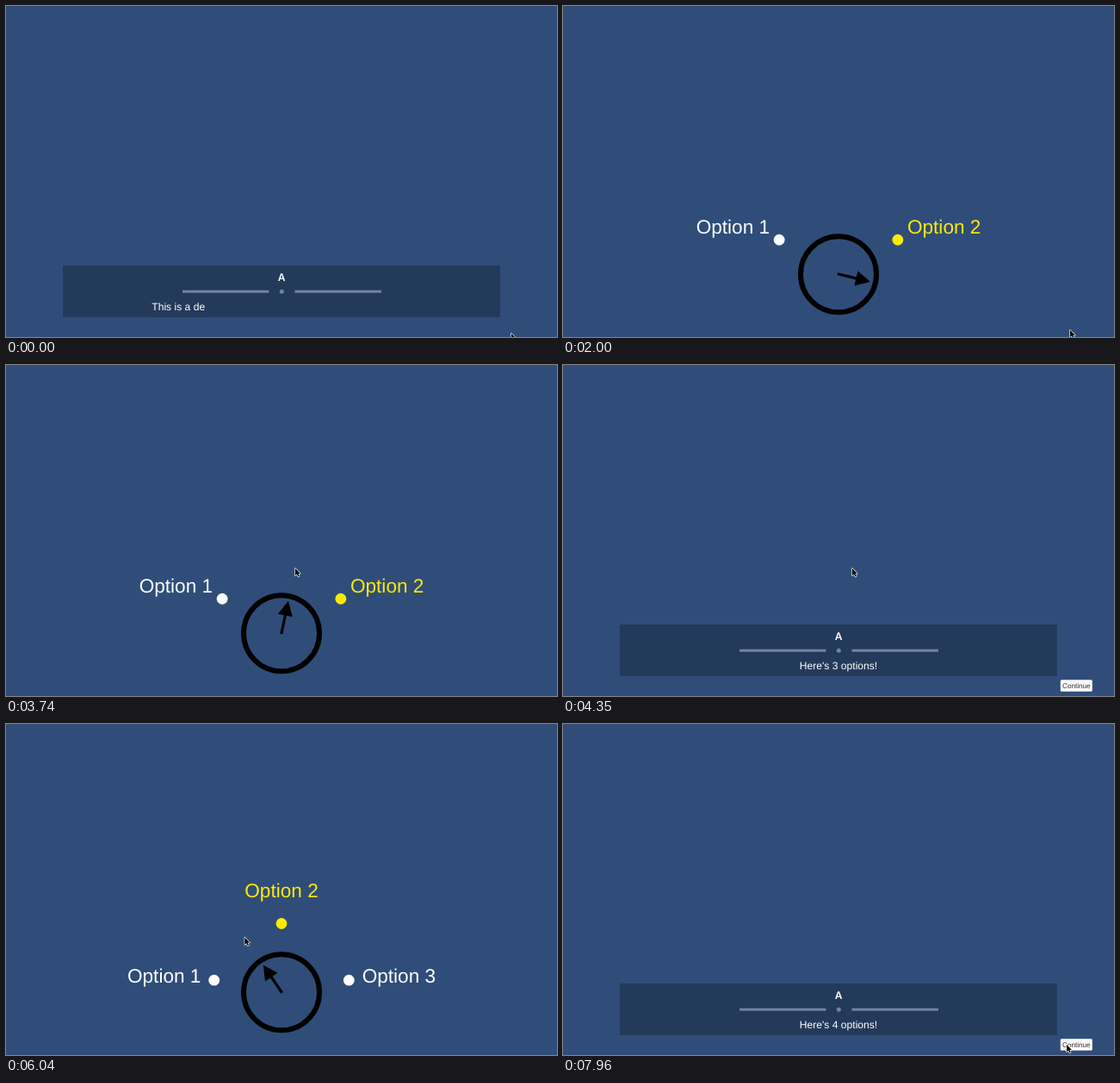
Recreate the animation shown at these times as an HTML page with a canvas. Size 640 by 384 pixels, loop 8000 ms.

```html
<!DOCTYPE html>
<html lang="en">
<head>
<meta charset="utf-8">
<title>Dialogue options</title>
<style>
html, body { margin: 0; height: 100%; overflow: hidden; background: #304d79; }
canvas { display: block; }
</style>
</head>
<body>
<canvas id="stage" width="640" height="384"></canvas>
<script>
const ctx = document.getElementById('stage').getContext('2d');
const { PI, abs, sin, cos, atan2, min, max, floor } = Math;
const LOOP = 8000;
const SANS = '"Liberation Sans", Arial, sans-serif';
const CX = 320, CY = 311;
const RATE = 0.115; // typed characters per ms

// Each round: line typed, Continue clicked, option picked.
// Options fan out by `spread` degrees to both sides of straight up.
const rounds = [
  { open: -405, click: 1150, pick: 3740, count: 2, spread: 60, intro: 'This is a demo of the Automatic layout! ' },
  { open: 3740, click: 4870, pick: 6740, count: 3, spread: 80, intro: '' },
  { open: 6740, click: LOOP, pick: LOOP, count: 4, spread: 90, intro: '' },
];

// Pointer moves: start time and destination
const MOVE = 300;
const moves = [
  [-MOVE, 587, 380], [50, 589, 376],
  [2100, 300, 238], [2370, 336, 237], [2800, 300, 238], [3200, 336, 236],
  [4420, 590, 367],
  [5500, 240, 250], [5900, 322, 245], [6200, 509, 245],
  [7420, 585, 372],
];

const ramp = (t, from, length) => min(1, max(0, (t - from) / length));
const mix = (a, b, k) => a + (b - a) * k;
const rad = deg => deg * PI / 180;

function pointerAt(t) {
  const i = moves.findLastIndex(m => m[0] <= t);
  const [t0, x, y] = moves[i], [, fromX, fromY] = moves[max(0, i - 1)];
  const k = ramp(t, t0, MOVE), ease = k * k * (3 - 2 * k);
  return [mix(fromX, x, ease), mix(fromY, y, ease)];
}

function label(text, x, y, size, color, family = SANS, weight = 400) {
  ctx.font = `${weight} ${size}px ${family}`;
  ctx.fillStyle = color;
  ctx.fillText(text, x, y);
}

function box(x, y, w, h, color, radius = 0) {
  ctx.fillStyle = color;
  ctx.beginPath();
  ctx.roundRect(x, y, w, h, radius);
  ctx.fill();
}

function disc(x, y, r, color) {
  ctx.fillStyle = color;
  ctx.beginPath();
  ctx.arc(x, y, r, 0, 2 * PI);
  ctx.fill();
}

function polygon(...pts) {
  ctx.beginPath();
  for (let i = 0; i < pts.length; i += 2) ctx.lineTo(pts[i], pts[i + 1]);
  ctx.closePath();
}

function drawDialog({ open, click, count, intro }, t) {
  const leave = 1 - ramp(t, click, 180);
  if (t < open || !leave) return;

  // The panel follows shortly after its content
  ctx.globalAlpha = leave * ramp(t, open + 90, 110);
  box(66, 301, 508, 60, '#243a5b');

  ctx.globalAlpha = leave * ramp(t, open + 20, 120);
  for (const x of [205, 335.5]) box(x, 329.8, 100.4, 2.9, '#7284a2');
  disc(320.3, 331.2, 2.5, '#7284a2');
  ctx.textAlign = 'center';
  label('A', CX, 318.7, 12, '#fff', 'Inter, sans-serif', 600);

  // Typed text keeps the place it has when complete
  const text = `${intro}Here's ${count} options!`;
  const typed = max(0, floor((t - open - 300) * RATE));
  ctx.textAlign = 'left';
  ctx.font = `12.1px ${SANS}`;
  const left = CX - ctx.measureText(text).width / 2;
  label(text.slice(0, typed), left, 352.5, 12.1, '#fff');

  if (typed > text.length + 3) {
    box(577.8, 365.3, 37, 13.4, '#fafafa', 1.5);
    ctx.textAlign = 'center';
    label('Continue', 596.3, 375, 8.15, '#323232');
  }
}

function drawMenu({ click, pick, count, spread }, t, [px, py]) {
  ctx.globalAlpha = ramp(t, click + 200, 180) * (1 - ramp(t, pick, 80));
  if (!ctx.globalAlpha) return;

  // The arrow starts pointing down, then swings to the pointer
  const aim = mix(PI / 2, atan2(py - CY, px - CX), ramp(t, click + 300, 260));
  const angles = Array.from({ length: count }, (_, i) => rad(spread * (2 * i / (count - 1) - 1) - 90));
  const gap = a => abs(atan2(sin(aim - a), cos(aim - a)));
  const closest = min(...angles.map(gap), rad(59));

  ctx.textAlign = 'center';
  angles.forEach((a, i) => {
    const color = gap(a) <= closest ? '#ffeb04' : '#fff';
    const stretch = 1 + 0.105 * sin(a) ** 2;
    disc(CX + 79.5 * cos(a), CY + 79.5 * sin(a), 6.4, color);
    label(`Option ${i + 1}`, CX + 138 * stretch * cos(a), CY + 7.8 + 106.8 * stretch * sin(a), 22.6, color);
  });

  ctx.strokeStyle = '#000';
  ctx.lineWidth = 6;
  ctx.beginPath();
  ctx.arc(CX, CY + 0.2, 44, 0, 2 * PI);
  ctx.stroke();

  ctx.save();
  ctx.translate(CX, CY);
  ctx.rotate(aim);
  box(-1, -1.6, 23, 3.2, '#000');
  polygon(21, -8.7, 38, 0, 21, 8.7);
  ctx.fill();
  ctx.restore();
}

function drawPointer([x, y]) {
  ctx.globalAlpha = 1;
  ctx.save();
  ctx.translate(x, y);
  ctx.scale(0.92, 0.92);
  polygon(0, 0, 0, 9, 2.1, 7.1, 3.6, 10.4, 5.1, 9.7, 3.7, 6.5, 6.4, 6.4);
  ctx.lineJoin = 'round';
  ctx.lineWidth = 1.4;
  ctx.strokeStyle = '#fff';
  ctx.stroke();
  ctx.fillStyle = '#000';
  ctx.fill();
  ctx.restore();
}

function draw(t) {
  const pointer = pointerAt(t);
  ctx.textRendering = 'geometricPrecision';
  ctx.globalAlpha = 1;
  box(0, 0, 640, 384, '#304d79');
  for (const round of rounds) {
    drawDialog(round, t);
    drawMenu(round, t, pointer);
  }
  drawPointer(pointer);
}

const start = performance.now();
function tick() {
  draw((performance.now() - start) % LOOP);
  requestAnimationFrame(tick);
}
tick();
</script>
</body>
</html>
```
